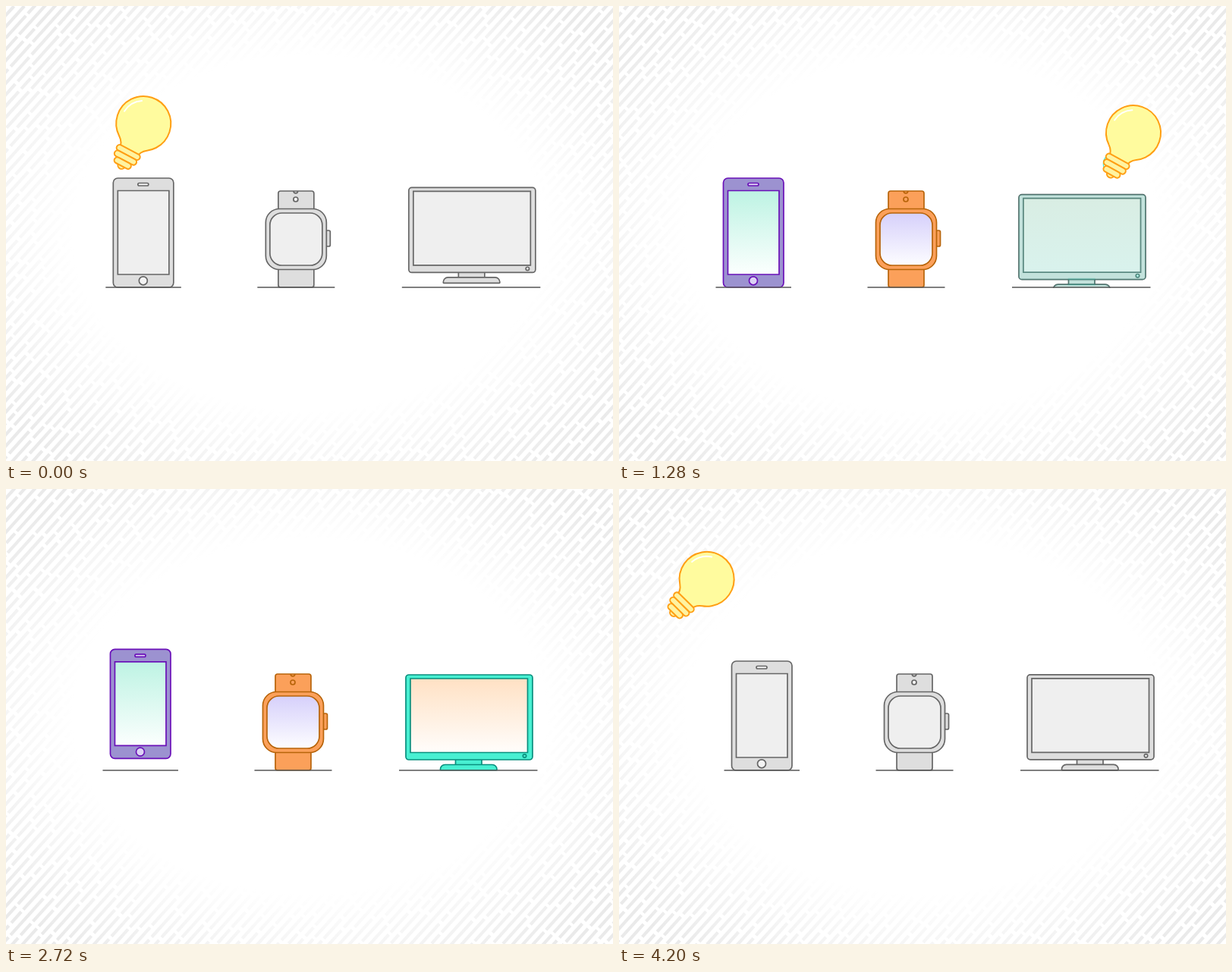
Animation, 800 px wide and 600 px high, one loop 4240 ms. Source, as an HTML page with a canvas:

```html
<!DOCTYPE html>
<html lang="en">
<head>
<meta charset="utf-8">
<title>Bright idea</title>
<style>
html, body { margin: 0; width: 100%; height: 100%; overflow: hidden; background: #fff; }
canvas { display: block; }
</style>
</head>
<body>
<canvas id="stage" width="800" height="600"></canvas>
<script>
const ctx = document.getElementById('stage').getContext('2d');
const LOOP = 4240, GROUND = 371, SWAP = 3480, TAU = Math.PI * 2, DEG = Math.PI / 180;
const clamp = v => Math.min(1, Math.max(0, v));
const easeOut = v => 1 - (1 - clamp(v)) ** 3;
const GREY = { fill: '#dedede', line: '#666', top: '#efefef', bottom: '#efefef', knob: '#f4f4f4' };

// hit: bulb lands; drop: top of the farewell hop; rise: back at ground level
const items = [
  { draw: phone, ground: [127.5, 227], hit: 10, drop: 2860, rise: 3675, burst: [180, 200], tilt: 0,
    look: { fill: '#9c92d0', line: '#6a10b8', top: '#bdf3e3', bottom: '#fcfffe', knob: '#dcd2f4' },
    bits: [[-17, -78], [-60, -66], [-52, 12], [-30, -16]] },
  { draw: watch, ground: [327.5, 429.5], hit: 660, drop: 2980, rise: 3832, burst: [381, 217], tilt: 0,
    look: { fill: '#fba05a', line: '#b8640a', top: '#d6d0fb', bottom: '#fdfdff', knob: '#fba05a' },
    bits: [[-15, -77], [-51, -57], [-49, 28], [-34, -5]] },
  { draw: tv, ground: [518, 700.5], hit: 1260, drop: 3100, rise: 4200, burst: [651, 208], tilt: -2.8,
    look: { fill: '#48f0d2', line: '#0a8f7e', top: '#ffe1c4', bottom: '#fffdfb', knob: '#48f0d2' },
    bits: [[-20, -80], [-78, -85], [-56, -20], [-22, -34]] }
];

// bulb landings: time, x, y
const landings = [[10, 196, 164], [660, 387, 178], [1260, 655, 178], [2020, 1051, 178]];

let seed = 7;
const random = () => (seed = seed * 16807 % 2147483647) / 2147483647;
const stripes = Array.from({ length: 104 }, (_, i) => {
  const dash = [25 + random() * 70, 5, 12 + random() * 40, 4];
  return { y: (i - 52) * 10, dash, length: dash.reduce((a, b) => a + b), phase: random() };
});

function at(x, y, angle, paint) {
  ctx.save();
  ctx.translate(x, y);
  ctx.rotate(angle * DEG);
  paint();
  ctx.restore();
}

function finish(fill) {
  if (fill) {
    ctx.fillStyle = fill;
    ctx.fill();
  }
  ctx.stroke();
}

function box(x, y, right, bottom, radius, fill) {
  ctx.beginPath();
  ctx.roundRect(x, y, right - x, bottom - y, radius);
  finish(fill);
}

function dot(x, y, radius, fill) {
  ctx.beginPath();
  ctx.arc(x, y, radius, 0, TAU);
  finish(fill);
}

function glass(look, y, bottom) {
  const shade = ctx.createLinearGradient(0, y, 0, bottom);
  shade.addColorStop(0, look.top);
  shade.addColorStop(1, look.bottom);
  return shade;
}

function phone(c) {
  box(137.5, 227, 217, 371, 6, c.fill);
  box(143.5, 243.5, 211, 354, 0, glass(c, 243, 354));
  box(170, 233.5, 184, 237, 1.7, c.knob);
  dot(177, 362.3, 5.5, c.knob);
}

function watch(c) {
  box(355, 244, 402, 272, 3, c.fill);
  ctx.beginPath();
  ctx.arc(378, 244, 2.8, 0, Math.PI);
  finish();
  dot(378, 255, 3, c.knob);
  box(355, 343, 402, 371, 3, c.fill);
  box(418, 296, 423.5, 317, 2, c.fill);
  box(338.5, 267.5, 418.5, 347.5, 18, c.fill);
  box(344, 273, 413, 342, 16, glass(c, 273, 342));
}

function tv(c) {
  box(592.5, 356, 627, 364, 0, c.fill);
  box(572.5, 363.5, 647, 371, [6, 6, 1, 1], c.fill);
  box(527, 245, 694, 357, 4, c.fill);
  box(533, 250, 687.5, 347.5, 0, glass(c, 250, 347));
  dot(683.5, 352, 2.2, c.knob);
}

function drawBackground(t) {
  ctx.fillStyle = '#fff';
  ctx.fillRect(0, 0, 800, 600);
  at(400, 300, -48, () => {
    ctx.strokeStyle = '#eaeaea';
    ctx.lineWidth = 4.2;
    for (const s of stripes) {
      ctx.setLineDash(s.dash);
      ctx.lineDashOffset = s.length * (s.phase - t / LOOP);
      ctx.beginPath();
      ctx.moveTo(-520, s.y);
      ctx.lineTo(520, s.y);
      ctx.stroke();
    }
  });
  ctx.save();
  ctx.translate(400, 300);
  ctx.scale(4, 3);
  const haze = ctx.createRadialGradient(0, 0, 78, 0, 0, 128);
  haze.addColorStop(0, '#fff');
  haze.addColorStop(1, 'rgba(255,255,255,0)');
  ctx.fillStyle = haze;
  ctx.fillRect(-100, -100, 200, 200);
  ctx.restore();
}

function sceneShift(t) {
  if (t >= SWAP) return (0.0627 * (LOOP + 40 - t)) ** 1.5;
  if (t < 40) return (0.0627 * (40 - t)) ** 1.5;
  return t > 2700 ? -12 * ((t - 2700) / 380) ** 2 : 0;
}

// Vertical offset of a device; positive is below its resting place
function lift(item, t) {
  const since = (t < item.hit ? t + LOOP : t) - item.rise;
  if (t >= SWAP || (t < item.hit && since < 220)) {
    return since < 0 ? -0.143 * since + 0.00167 * since * since
                     : -10 * Math.sin(Math.PI * clamp(since / 220));
  }
  const age = t - item.hit;
  if (age > 0 && age < 100) return 6 * Math.sin(Math.PI * age / 100);
  if (age >= 100 && age < 500) return -100 * hop(age) * (1 - hop(age));
  const fall = t - item.drop;
  if (fall > 0) return -34 + 0.0041 * fall * fall;
  return -34 * Math.sin(Math.PI / 2 * clamp(1 + fall / 200));
}

function hop(age) { return clamp((age - 100) / 400); }

function groundScale(item, i, t) {
  if (t >= SWAP) return easeOut((t - SWAP - 20 - i * 60) / 180);
  return 1 - clamp((t - item.drop - 185) / 150);
}

function drawItem(item, i, t) {
  const [left, right] = item.ground;
  const mid = (left + right) / 2, half = (right - left) / 2 * groundScale(item, i, t);
  const age = t - item.hit;
  const tint = t < SWAP ? clamp(age / 120) : 0;

  ctx.save();
  ctx.beginPath();
  ctx.rect(-400, 0, 1800, GROUND + 0.8);
  ctx.clip();
  at(mid, GROUND + lift(item, t), item.tilt * Math.sin(Math.PI * hop(age)), () => {
    ctx.translate(-mid, -GROUND);
    ctx.lineWidth = 1.7;
    for (const [look, alpha] of [[GREY, 1], [item.look, tint]]) {
      if (!alpha || (look === GREY && tint === 1)) continue;
      ctx.globalAlpha = alpha;
      ctx.strokeStyle = look.line;
      item.draw(look);
    }
  });
  ctx.restore();

  if (half <= 0) return;
  ctx.strokeStyle = '#555';
  ctx.lineWidth = 1.5;
  ctx.beginPath();
  ctx.moveTo(mid - half, GROUND);
  ctx.lineTo(mid + half, GROUND);
  ctx.stroke();
}

function ngon(sides, radius) {
  ctx.beginPath();
  for (let i = 0; i < sides; i++) {
    const a = i / sides * TAU - Math.PI / 2;
    ctx.lineTo(radius * Math.cos(a), radius * Math.sin(a));
  }
  ctx.closePath();
  ctx.stroke();
}

function squiggle() {
  ctx.beginPath();
  for (let x = -29; x <= 29; x++) ctx.lineTo(x, 4 * Math.sin(x / 29 * Math.PI * 2.7));
  ctx.stroke();
}

function drawBurst(item, t) {
  const age = t - item.hit;
  if (age <= 0 || age >= 620) return;
  const [x, y] = item.burst;
  ctx.save();
  ctx.globalAlpha = clamp(1.15 - age / 520);
  ctx.strokeStyle = item.look.fill;
  ctx.lineWidth = 1.2;
  dot(x, y, 57 * easeOut(age / 260));

  ctx.globalAlpha = 1;
  ctx.strokeStyle = item.look.line;
  ctx.lineCap = 'round';
  // Each burst is calibrated at a moment well into its flight
  const reach = easeOut(age / 600) / easeOut(item.tilt ? 380 / 600 : 260 / 600);
  const size = Math.min(clamp(age / 80), clamp((620 - age) / 160));
  const shapes = [
    [0, 2.5, () => dot(0, 0, 4.8)],
    [0, 2, () => ngon(3, 5.5)],
    [-15 + age * 0.03, 1.8, () => ngon(4, 5)],
    [-100 + age * 0.41, 2.2, squiggle]
  ];
  shapes.forEach(([angle, width, paint], i) => {
    const [dx, dy] = item.bits[i];
    at(x + dx * reach, y + dy * reach, angle, () => {
      ctx.scale(size, size);
      ctx.lineWidth = width;
      paint();
    });
  });
  ctx.restore();
}

function bulbPose(t) {
  const [first, x, y] = landings[0];
  const left = (first - t + LOOP) % LOOP;
  if (left < 260) return [x - 1.64 * left, y - 1.02 * left + 0.002 * left * left, 24 + 0.42 * left];
  const i = landings.findIndex(l => t < l[0]);
  if (i < 1) return null;
  const [t0, x0, y0] = landings[i - 1], [t1, x1, y1] = landings[i];
  const u = (t - t0) / (t1 - t0), s = 2 * u - 1;
  const across = 0.5 + 0.2 * s + 0.3 * s ** 3;
  return [x0 + (x1 - x0) * across, y0 + (y1 - y0) * u - 53 * (1 - s ** 4), 24 + 46 * (1 - s * s)];
}

function drawBulb(t) {
  const pose = bulbPose(t);
  if (!pose) return;
  at(...pose, () => {
    ctx.strokeStyle = '#ff9f14';
    ctx.lineWidth = 2;
    dot(0, 62, 5, '#fff3a0');
    ctx.beginPath();
    ctx.arc(0, 0, 36, 125 * DEG, 55 * DEG);
    ctx.quadraticCurveTo(13, 35, 13, 43);
    ctx.lineTo(-13, 43);
    ctx.quadraticCurveTo(-13, 35, -20.6, 29.5);
    finish('#fffb9e');
    for (const [y, half] of [[43, 17], [51, 16], [59, 12]]) {
      box(-half, y - 4, half, y + 4, 4, '#fff3a0');
    }
    ctx.strokeStyle = '#fff';
    ctx.lineCap = 'round';
    ctx.beginPath();
    ctx.arc(0, 0, 30, -175 * DEG, -122 * DEG);
    ctx.stroke();
  });
}

function frame(now) {
  const t = now % LOOP;
  drawBackground(t);
  ctx.save();
  ctx.translate(sceneShift(t), 0);
  items.forEach((item, i) => drawItem(item, i, t));
  items.forEach(item => drawBurst(item, t));
  ctx.restore();
  drawBulb(t);
  requestAnimationFrame(show);
}

const start = performance.now();
function show() { frame(performance.now() - start); }
show();
</script>
</body>
</html>
```
